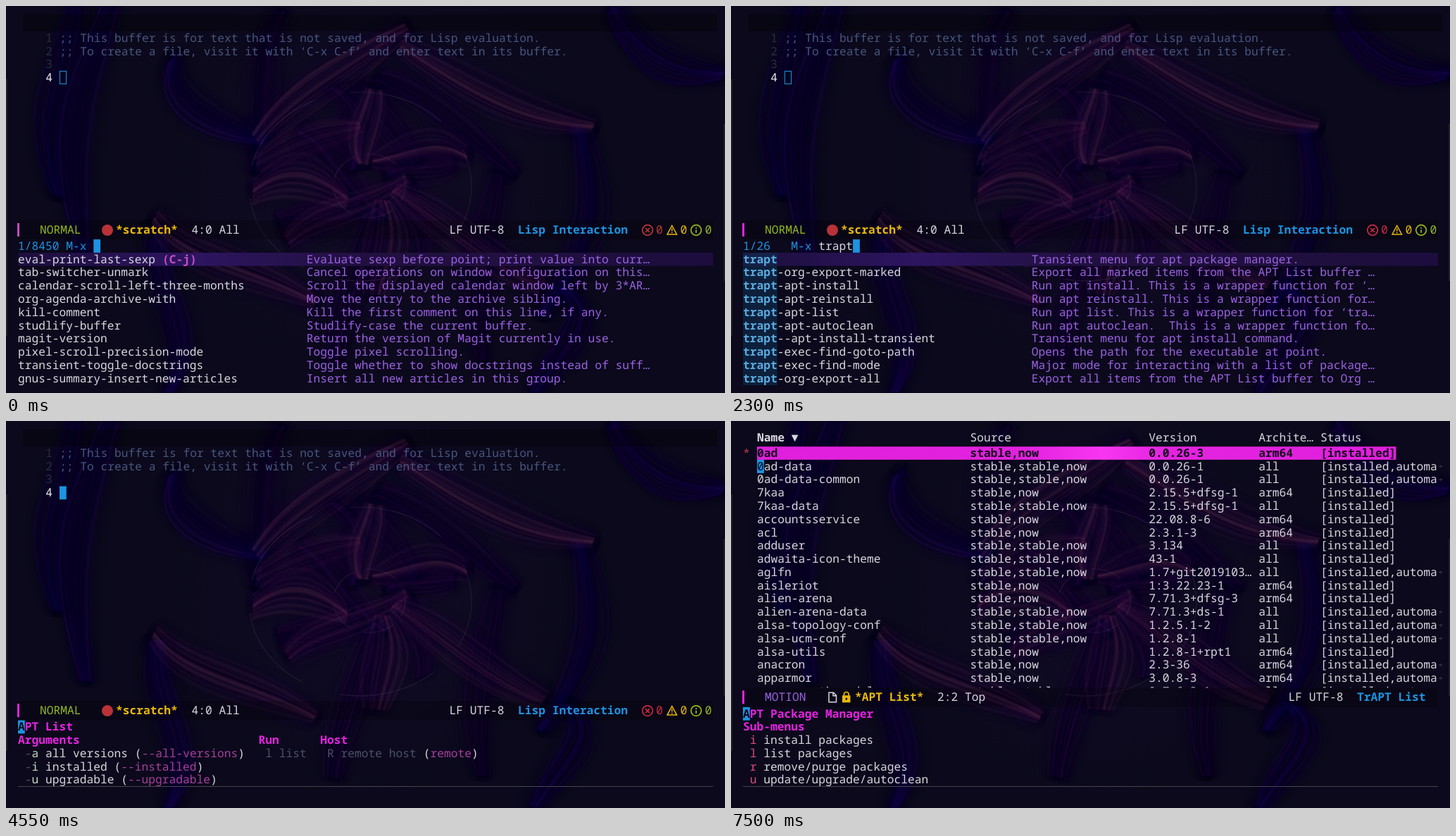
Recreate the animation shown at these times as an HTML page with a canvas. Size 1021 by 549 pixels, loop 8000 ms.

```html
<!DOCTYPE html>
<html lang="en">
<head>
<meta charset="utf-8">
<title>Package manager session</title>
<style>
html, body { margin: 0; width: 100%; height: 100%; overflow: hidden; background: #0b091b; }
canvas { display: block; }
</style>
</head>
<body>
<canvas id="stage" width="1021" height="549"></canvas>
<script>
const W = 1021, H = 549, LOOP = 8000;
const CW = 9.757, ROW = 18.78, SIZE = CW / 0.6;
const FG = '#d9d6e0', BLUE = '#1d93e2', PURPLE = '#9b62e4', PINK = '#e622e0',
  GREEN = '#94b81e', GOLD = '#e8b90c', RED = '#cc2844', DARK = '#0b0918',
  DIM = '#4b5169', KEY = '#c2dcc6', EXIT = '#dc4c78', ARG = '#a63f9c';
const ctx = document.getElementById('stage').getContext('2d');

function rect(x, y, w, h, color, c = ctx) {
  c.fillStyle = color;
  c.fillRect(x, y, w, h);
}

// y is the middle of the text row
function text(str, x, y, color = FG, bold = false) {
  ctx.font = `${bold ? 'bold ' : ''}${SIZE}px "Noto Sans Mono", "DejaVu Sans Mono", monospace`;
  ctx.fillStyle = color;
  ctx.fillText(str, x, y + 5.3);
}

function run(x, y, ...parts) {
  for (const [str, color, bold] of parts) {
    text(str, x, y, color, bold);
    x += str.length * CW;
  }
}

function block(x, y, char = '', bold = false) {
  rect(x, y - ROW / 2, CW, ROW, BLUE);
  text(char, x, y, DARK, bold);
}

// ---- backdrop ----
function makeBackdrop() {
  const canvas = document.createElement('canvas');
  canvas.width = W;
  canvas.height = H;
  const c = canvas.getContext('2d');
  let seed = 7;
  const random = () => (seed = seed * 16807 % 2147483647) / 2147483647;

  // one brush stroke, shifted sideways by d and narrowing at both ends
  const stroke = ([x0, y0, x1, y1, x2, y2, x3, y3], d, width, color) => {
    const len = Math.hypot(x3 - x0, y3 - y0);
    const nx = (y0 - y3) / len * d, ny = (x3 - x0) / len * d;
    c.strokeStyle = color;
    c.lineWidth = width;
    c.beginPath();
    c.moveTo(x0 + nx * 0.5, y0 + ny * 0.5);
    c.bezierCurveTo(x1 + nx, y1 + ny, x2 + nx * 1.2, y2 + ny * 1.2, x3 + nx * 0.3, y3 + ny * 0.3);
    c.stroke();
  };
  const feathers = (curves, rgb, spread, strength) => {
    c.filter = 'blur(7px)';
    for (const curve of curves) for (let i = -3; i <= 3; i++)
      stroke(curve, i / 3 * spread, spread * 0.7, `rgba(52,22,120,${0.028 * strength})`);
    c.filter = 'blur(0.8px)';
    for (const curve of curves) for (let i = 0; i < 34; i++) {
      const d = (random() + random() - 1) * spread * 1.5;
      stroke(curve, d, 1 + random() * 4, `rgba(${rgb},${random() * 0.11 * strength})`);
    }
    c.filter = 'none';
  };

  rect(0, 0, W, H, '#0b091b', c);
  const haze = c.createRadialGradient(516, 240, 0, 516, 240, 300);
  haze.addColorStop(0, 'rgba(62,36,84,.13)');
  haze.addColorStop(0.5, 'rgba(46,20,92,.09)');
  haze.addColorStop(1, 'rgba(40,16,100,0)');
  rect(0, 0, W, H, haze, c);

  const streams = [
    [100, 0, 95, 80, 40, 150, 75, 270],
    [150, 0, 110, 130, 80, 180, 115, 370],
    [860, 0, 900, 80, 960, 100, 1021, 95],
    [815, 170, 835, 260, 850, 320, 760, 440],
    [215, 310, 200, 400, 280, 460, 230, 549],
    [790, 400, 850, 440, 780, 490, 750, 549],
    [240, 70, 220, 130, 290, 170, 370, 190]
  ];
  const blades = [
    [525, 118, 525, 155, 500, 190, 508, 225],
    [355, 225, 410, 195, 450, 180, 505, 172],
    [350, 265, 400, 225, 440, 240, 485, 275],
    [400, 335, 440, 290, 500, 300, 571, 245],
    [525, 410, 530, 360, 550, 330, 535, 275],
    [765, 395, 680, 360, 610, 285, 550, 260],
    [655, 215, 610, 185, 570, 215, 520, 220],
    [560, 55, 640, 100, 720, 160, 835, 170],
    [355, 190, 400, 130, 470, 90, 570, 30],
    [210, 300, 250, 360, 350, 370, 440, 420]
  ];
  feathers(streams, '48,22,120', 24, 1);
  c.save();
  c.translate(516, 255);
  c.rotate(1.257);
  c.scale(0.9, 0.9);
  c.translate(-516, -255);
  feathers(blades, '76,36,104', 26, 0.7);
  c.restore();
  feathers(blades, '110,66,88', 25, 1.2);

  c.lineWidth = 1.2;
  c.strokeStyle = 'rgba(85,65,95,.3)';
  for (const [x, y, rx, ry] of [[503, 256, 158, 134], [516, 255, 51, 45]])
    for (let k = 0; k < 5; k++) {
      c.beginPath();
      c.ellipse(x, y, rx, ry, 0, k * 1.257 - 0.4, k * 1.257 + 0.5);
      c.stroke();
    }
  rect(0, 104, 2, 364, '#202026', c);
  rect(1019, 167, 2, 223, '#202026', c);
  return canvas;
}
const backdrop = makeBackdrop();

// ---- mode line ----
function ring(x, y, color) {
  ctx.strokeStyle = color;
  ctx.lineWidth = 1.7;
  ctx.beginPath();
  ctx.arc(x, y, 7.3, 0, 7);
  ctx.stroke();
}

function path(d, color, width = 1.7) {
  ctx.strokeStyle = color;
  ctx.lineWidth = width;
  ctx.stroke(new Path2D(d));
}

function modeBase(y, name, color, bar = PINK) {
  rect(16, y - 13.5, 988, 27, 'rgba(0,0,0,.22)');
  rect(16, y - 9.5, 3, 19, bar);
  text(name, 48, y, color);
}

function scratchMode(y, first) {
  const red = first ? '#b93838' : RED;
  modeBase(y, 'NORMAL', GREEN, first ? '#c44ac6' : PINK);
  ctx.fillStyle = '#b83238';
  ctx.beginPath();
  ctx.arc(144, y + 0.5, 8, 0, 7);
  ctx.fill();
  text('*scratch*', 156, y, GOLD, true);
  text('4:0 All', 263.5, y);
  text('LF UTF-8', 629.5, y);
  text('Lisp Interaction', 727, y, BLUE, true);
  ring(911, y + 0.5, red);
  path(`M908 ${y - 2.5}l6 6m0-6l-6 6`, red);
  text('0', 923, y, red);
  path(`M945.7 ${y - 6}L952.5 ${y + 6.5}H939ZM945.7 ${y - 2}v4m0 1.2v1.6`, GOLD, 1.5);
  text('0', 957.5, y, GOLD);
  ring(980, y + 0.5, GREEN);
  path(`M980 ${y - 3.5}v1.8m0 1.5v4.5`, GREEN);
  text('0', 992.5, y, GREEN);
}

function listMode(y) {
  modeBase(y, 'MOTION', PURPLE);
  path(`M139 ${y - 6.5}h6.5l4 4v9.5h-10.5zM145 ${y - 6.5}v4.5h4.5`, FG, 1.5);
  rect(158, y - 2.5, 11.5, 10, GOLD);
  path(`M160.5 ${y - 2}v-2a3.3 3.3 0 0 1 6.6 0v2`, GOLD);
  rect(162.7, y + 1, 2.4, 2.8, DARK);
  text('*APT List*', 176, y, GOLD, true);
  text('2:2 Top', 293, y);
  text('LF UTF-8', 791.5, y);
  text('TrAPT List', 889, y, BLUE, true);
}

// ---- scratch buffer ----
function scratch(active) {
  rect(24, 12, 986, 24, 'rgba(0,0,0,.3)');
  const lines = [
    ';; This buffer is for text that is not saved, and for Lisp evaluation.',
    ';; To create a file, visit it with ‘C-x C-f’ and enter text in its buffer.', '', ''
  ];
  lines.forEach((line, i) => {
    const y = 45.6 + i * ROW;
    text(String(i + 1), 56.3, y, i === 3 ? '#eceaf0' : '#2d2e3e');
    text(line, 76, y, '#48567f');
  });
  if (active) return block(76, 101.9);
  ctx.strokeStyle = BLUE;
  ctx.lineWidth = 1;
  ctx.strokeRect(76.5, 92.5, 9, 18);
}

// ---- command completion ----
const rows = s => s.trim().split('\n').map(line => line.split('|'));
const allCommands = rows(`
eval-print-last-sexp|Evaluate sexp before point; print value into curr…
tab-switcher-unmark|Cancel operations on window configuration on this…
calendar-scroll-left-three-months|Scroll the displayed calendar window left by 3*AR…
org-agenda-archive-with|Move the entry to the archive sibling.
kill-comment|Kill the first comment on this line, if any.
studlify-buffer|Studlify-case the current buffer.
magit-version|Return the version of Magit currently in use.
pixel-scroll-precision-mode|Toggle pixel scrolling.
transient-toggle-docstrings|Toggle whether to show docstrings instead of suff…
gnus-summary-insert-new-articles|Insert all new articles in this group.`);
const trCommands = rows(`
transient-toggle-docstrings|Toggle whether to show docstrings instead of suff…
article-strip-leading-space|Remove all white space from the beginning of the …
org-advertized-archive-subtree|Move the current subtree to the archive.
elfeed-search-last-entry|Place point on last entry.
traceroute|Run ‘traceroute-program’ for TARGET.
org-move-subtree-up|Move the current subtree up past ARG headlines of…
comint-strip-ctrl-m|Strip trailing ‘^M’ characters from the current o…
tramp-cleanup-connection|Flush all connection related objects.
transient-show|Show the transient’s state in the menu buffer.
gnus-summary-limit-to-extra|Limit the summary buffer to articles that match a…`);
const traptCommands = rows(`
trapt|Transient menu for apt package manager.
trapt-org-export-marked|Export all marked items from the APT List buffer …
trapt-apt-install|Run apt install. This is a wrapper function for ‘…
trapt-apt-reinstall|Run apt reinstall. This is a wrapper function for…
trapt-apt-list|Run apt list. This is a wrapper function for ‘tra…
trapt-apt-autoclean|Run apt autoclean.  This is a wrapper function fo…
trapt--apt-install-transient|Transient menu for apt install command.
trapt-exec-find-goto-path|Opens the path for the executable at point.
trapt-exec-find-mode|Major mode for interacting with a list of package…
trapt-org-export-all|Export all items from the APT List buffer to Org …`);

function completion(count, typed, commands) {
  scratch(false);
  scratchMode(317.5, !typed);
  run(17, 340.5, [`1/${count}`.padEnd(7) + 'M-x ', BLUE], [typed, FG]);
  block(17 + (11 + typed.length) * CW, 340.5);
  const glow = ctx.createLinearGradient(17, 0, 1004, 0);
  ['#1c0e3c', '#2d1560', '#21103f', '#20103f', '#1c0d3e'].forEach((color, i) => glow.addColorStop(i / 4, color));
  rect(17, 350, 987, 18.7, glow);
  commands.forEach(([name, doc], i) => {
    const y = 359.4 + i * ROW, at = name.indexOf(typed);
    if (typed) rect(17 + at * CW, y - ROW / 2, typed.length * CW, ROW, 'rgba(16,48,82,.6)');
    run(17, y, [name.slice(0, at)], [typed, '#5baade', true], [name.slice(at + typed.length)]);
    if (!typed && i === 0) text('(C-j)', 17 + 21 * CW, y, '#c94ccb', true);
    text(doc, 17 + 42 * CW, y, PURPLE);
  });
}

// ---- transient menus ----
function menuTitle(y, title) {
  text(title, 17, y, PINK, true);
  block(17, y, title[0], true);
  rect(17, 518, 987, 1, '#47464c');
}

function mainMenu() {
  menuTitle(415.3, 'APT Package Manager');
  text('Sub-menus', 17, 434, PINK, true);
  ['install packages', 'list packages', 'remove/purge packages', 'update/upgrade/autoclean']
    .forEach((label, i) => run(17 + CW, 452.8 + i * ROW, [label[0], EXIT], [' ' + label]));
}

function listMenu(pending, installed, running) {
  menuTitle(434, 'APT List');
  [['Arguments', 0], ['Run', 35], ['Host', 44]]
    .forEach(([head, col]) => text(head, 17 + col * CW, 452.8, PINK, true));
  const key = pending ? DIM : KEY, label = pending ? DIM : FG;
  ['all versions', 'installed', 'upgradable'].forEach((name, i) => {
    const on = installed && i === 1;
    run(17 + CW, 471.6 + i * ROW, ['-', key], [name[0], KEY], [` ${name} (`],
      ['--' + name.replace(' ', '-'), on ? '#7772cc' : ARG, on], [')']);
  });
  run(17 + 36 * CW, 471.6, ['l', key], [' list', label]);
  run(17 + 45 * CW, 471.6, ['R', key], [' remote host', label], [' ('], ['remote', ARG], [')']);
  if (running) text('Running: sudo apt list  --installed', 17, 528.4);
}

function listMenuScene(...state) {
  scratch(true);
  scratchMode(410.6);
  listMenu(...state);
}

// ---- package list: name, version, + for arch all, ~ for automatic ----
const packages = rows(`
0ad|0.0.26-3|
0ad-data|0.0.26-1|+~
0ad-data-common|0.0.26-1|+~
7kaa|2.15.5+dfsg-1|
7kaa-data|2.15.5+dfsg-1|+
accountsservice|22.08.8-6|
acl|2.3.1-3|
adduser|3.134|+
adwaita-icon-theme|43-1|+
aglfn|1.7+git2019103…|+~
aisleriot|1:3.22.23-1|
alien-arena|7.71.3+dfsg-3|
alien-arena-data|7.71.3+ds-1|+~
alsa-topology-conf|1.2.5.1-2|+~
alsa-ucm-conf|1.2.8-1|+~
alsa-utils|1.2.8-1+rpt1|
anacron|2.3-36|~
apparmor|3.0.8-3|~
appmenu-gtk-module-common|0.7.6-2.1|+~
appmenu-gtk2-module|0.7.6-2.1|~
appmenu-gtk3-module|0.7.6-2.1|
appmenu-registrar|0.7.6-2|~
appstream|0.16.1-2|~
apt|2.6.1|
apt-config-icons|0.16.1-2|+~`);
const columns = [0, 31, 57, 73, 82].map(col => 37 + col * CW);

function packageList(bottom) {
  ['Name ▼', 'Source', 'Version', 'Archite…', 'Status']
    .forEach((head, i) => text(head, columns[i], 24, FG, i === 0));
  ctx.save();
  ctx.beginPath();
  ctx.rect(0, 36, W, bottom - 36);
  ctx.clip();
  const mark = ctx.createLinearGradient(37, 0, 944, 0);
  [[0, '#e01fdc'], [0.42, '#e222de'], [0.54, '#f836f2'], [0.64, '#e424e0'], [1, '#e01fdc']]
    .forEach(stop => mark.addColorStop(...stop));
  rect(37, 36.3, 93 * CW, 18.6, mark);
  text('*', 17, 45.6, '#c23a4c');
  packages.forEach(([name, version, flags], i) => {
    const y = 45.6 + i * ROW, all = flags.includes('+'), auto = flags.includes('~');
    if (i === 1) rect(37, y - ROW / 2, CW, ROW, BLUE);
    [name, all ? 'stable,stable,now' : 'stable,now', version, all ? 'all' : 'arm64',
      auto ? '[installed,automa' : '[installed]']
      .forEach((cell, k) => text(cell, columns[k], y, i ? FG : '#14061c', !i));
    if (auto) path(`M1005 ${y}h4.5m-2-2l2 2l-2 2`, '#3d3b4c', 1);
    if (i === 1) block(37, y, '0');
  });
  ctx.restore();
}

// ---- timeline ----
const scenes = [
  [0, () => completion(8450, '', allCommands)],
  [1000, () => completion(621, 'tr', trCommands)],
  [2130, () => completion(27, 'trap', traptCommands)],
  [2300, () => completion(26, 'trapt', traptCommands)],
  [2630, () => { scratch(true); scratchMode(391.8); mainMenu(); }],
  [2960, () => listMenuScene()],
  [4550, () => listMenuScene(true)],
  [5130, () => listMenuScene(false, true)],
  [5440, () => listMenuScene(false, true, true)],
  [5820, () => { packageList(491); listMode(505.3); }],
  [7500, () => { packageList(378.5); listMode(391.8); mainMenu(); }]
];

ctx.textRendering = 'geometricPrecision';
let start;
function frame(now) {
  start ??= now;
  const t = (now - start) % LOOP;
  ctx.drawImage(backdrop, 0, 0);
  scenes.findLast(([from]) => t >= from)[1]();
  requestAnimationFrame(frame);
}
requestAnimationFrame(frame);
</script>
</body>
</html>
```
